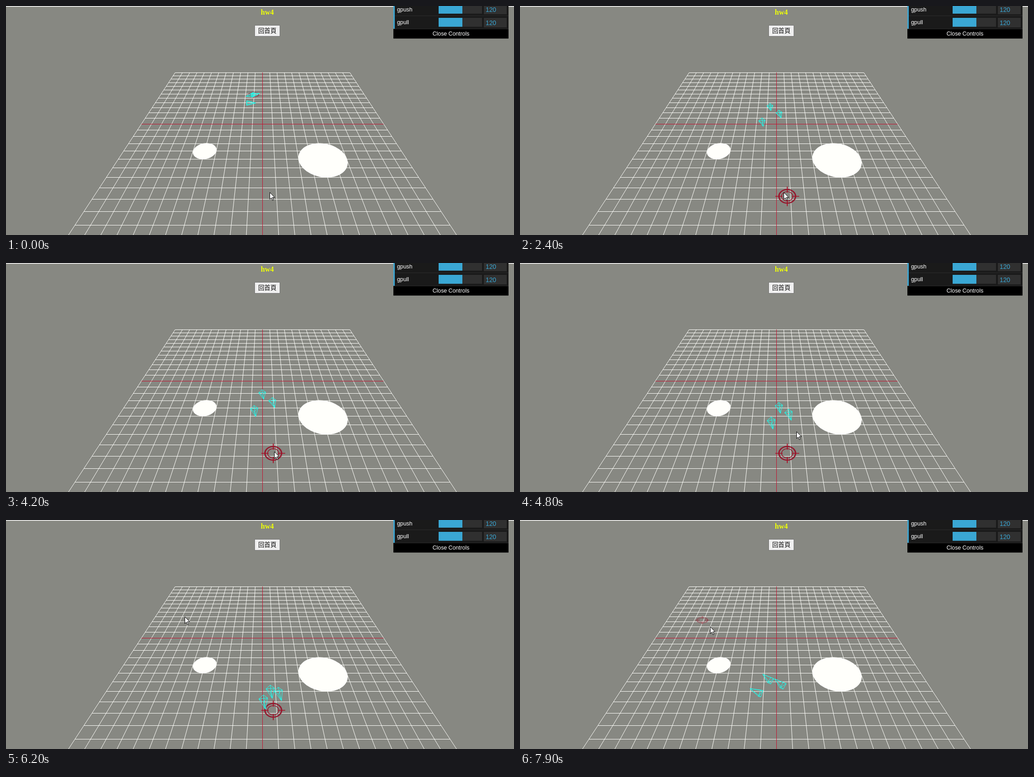
An HTML page with a canvas that plays this animation: 1112x503 px, repeating every 8 s.

```html
<!DOCTYPE html>
<html>
<head>
<meta charset="utf-8">
<style>
html, body { margin: 0; width: 100%; height: 100%; overflow: hidden; background: #878882; }
canvas { display: block; }
</style>
</head>
<body>
<canvas id="stage" width="1112" height="503"></canvas>
<script>
const ctx = document.getElementById('stage').getContext('2d');
const LOOP = 8000, STEP = 100;
const SANS = '"Liberation Sans", Arial, sans-serif';
const RED = '#c4102e', CYAN = '#1cfff0', WHITE = '#fffffb';

const clamp = p => Math.max(0, Math.min(1, p));
const ease = p => p * p * (3 - 2 * p);
const mix = (a, b, p) => a + (b - a) * p;
const progress = (t, from, to) => clamp((t - from) / (to - from));

// Ground plane (u right, v towards the viewer) <-> screen
const CX = 561.5, HORIZON = -145.6, DEPTH = 404.6, UNIT = 22.08;
const HALF = 12, TILT = 0.3865 / HALF, RISE = 17.7;
const scaleAt = y => (y - HORIZON) / DEPTH;
function project(u, v, h = 0) {
  const s = 1 / (1 - TILT * v);
  return [CX + UNIT * u * s, HORIZON + DEPTH * s - RISE * h * s];
}
function unproject([x, y]) {
  const s = scaleAt(y);
  return [(x - CX) / (UNIT * s), (1 - 1 / s) / TILT];
}

// Each boid glides from start to dock, then leaves for the next target.
// spin: initial heading offset; bend: how late it moves along u and v
const TRAVEL = 6800, TURN = 6600, LAST = 7900;
const boids = [
  { start: [527, 213], dock: [565, 398], leave: [527, 381], spin: 1.4, bend: [1.5, 1] },
  { start: [542, 194], dock: [580, 378], leave: [549, 353], spin: -1.2, bend: [1.3, 1.3] },
  { start: [538, 196], dock: [597, 381], leave: [576, 364], spin: 1.8, bend: [.4, 1] }
].map(b => ({ ...b, path: [b.start, b.dock, b.leave].map(unproject) }));

const heading = (a, b) => Math.atan2(b[0] - a[0], b[1] - a[1]);
function boidPose({ path: [start, dock, leave], spin, bend }, t) {
  const glide = ease(clamp(t / TRAVEL));
  const away = progress(t, TURN, LAST) ** 2;
  const pos = start.map((a, k) =>
    mix(a, dock[k], glide ** bend[k]) + (leave[k] - dock[k]) * away);
  const cruise = heading(start, dock) + spin * Math.exp(-t / 550);
  const turn = ease(progress(t, TURN - 200, LAST - 300));
  return [...pos, mix(cruise, heading(dock, leave), turn)];
}

// Pointer moves: when, until when, where to
const pointerHome = [577, 409];
const pointerMoves = [
  [2400, 4200, 587, 414],
  [4600, 5400, 659, 239],
  [5400, 6100, 391, 212],
  [7200, 7900, 416, 234]
];
const pointerAt = t => pointerMoves.reduce(([x, y], [from, to, nx, ny]) => {
  const p = progress(t, from, to);
  return [mix(x, nx, p), mix(y, ny, p)];
}, pointerHome);

function rect(x, y, w, h, color) {
  ctx.fillStyle = color;
  ctx.fillRect(x, y, w, h);
}
function text(str, x, y, font, color, align = 'left') {
  ctx.font = font;
  ctx.fillStyle = color;
  ctx.textAlign = align;
  ctx.fillText(str, x, y);
}
function line(a, b, color) {
  ctx.strokeStyle = color;
  ctx.beginPath();
  ctx.moveTo(...a);
  ctx.lineTo(...b);
  ctx.stroke();
}
function disc(x, y, rx, ry, angle) {
  ctx.fillStyle = WHITE;
  ctx.beginPath();
  ctx.ellipse(x, y, rx, ry, angle, 0, 7);
  ctx.fill();
}

function drawGrid() {
  const row = (i, color) => {
    const [x, y] = project(-HALF, i), level = Math.floor(y + .01) + .5;
    line([x, level], [2 * CX - x, level], color);
  };
  const column = (i, color) => line(project(i, -HALF), project(i, HALF), color);
  ctx.lineWidth = 1;
  for (let i = -HALF; i <= HALF; i++) {
    if (!i) continue;
    row(i, WHITE);
    column(i, WHITE);
  }
  row(0, RED);
  column(0, RED);
}

function drawTarget(x, y) {
  const s = scaleAt(y);
  ctx.save();
  ctx.translate(x, y);
  ctx.scale(UNIT * s, DEPTH * TILT * s * s);
  ctx.globalAlpha = s > 1 ? .9 : .55;
  ctx.strokeStyle = '#960e26';
  for (const [r, w] of [[.59, .1], [.4, .055]]) {
    ctx.lineWidth = w;
    ctx.beginPath();
    ctx.arc(0, 0, r, 0, 7);
    ctx.stroke();
  }
  ctx.lineWidth = .065;
  for (let i = 0; i < 4; i++) {
    line([.33, 0], [.85, 0], '#a80c24');
    ctx.rotate(Math.PI / 2);
  }
  ctx.restore();
}

// Four-sided wireframe cone lying along its heading
function drawBoid([u, v, a]) {
  const r = .33, du = Math.sin(a), dv = Math.cos(a);
  const apex = project(u + du, v + dv);
  const base = [[1, 0], [0, 1], [-1, 0], [0, -1]].map(([side, up]) =>
    project(u + r * side * dv, v - r * side * du, r * up));
  ctx.lineWidth = 1;
  base.forEach((p, i) => {
    line(p, base[(i + 1) % 4], CYAN);
    line(p, apex, CYAN);
  });
  line(base[0], base[2], CYAN);
}

function drawPanel() {
  const font = '12.3px ' + SANS, blue = '#3aa5d2';
  rect(848, 0, 252, 51, '#1a1a1a');
  ['gpush', 'gpull'].forEach((label, i) => {
    const top = -7 + i * 28.8;
    rect(848, top + 28, 252, 1, '#2c2c2c');
    rect(947, top + 4.2, 95, 19.6, '#303030');
    rect(947, top + 4.2, 52, 19.6, '#3aa7d4');
    rect(1046, top + 4.2, 50, 21, '#303030');
    text(label, 856, top + 18.5, font, '#fff');
    text('120', 1050, top + 20.2, '13.8px ' + SANS, blue);
  });
  rect(848, 0, 3, 50, blue);
  rect(848, 51, 252, 20.5, '#000');
  text('Close Controls', 974, 65, font, '#fff', 'center');
}

function drawHeader() {
  rect(0, 0, 1112, 1.5, '#fff');
  text('hw4', 572, 19, 'bold 16px "Liberation Serif", serif', '#eeff08', 'center');
  rect(544, 42, 56, 25, '#767676');
  rect(545, 43, 54, 23, '#efefef');
  text('回首頁', 572, 59, '13.4px "Noto Sans CJK TC", "Noto Sans CJK", sans-serif', '#111', 'center');
}

const arrow = new Path2D('M.5.5V15.5L4 12.4 6.4 18 8.6 17 6.2 11.5H11Z');
function drawPointer(x, y) {
  ctx.save();
  ctx.translate(Math.round(x), Math.round(y));
  ctx.lineWidth = 1;
  ctx.fillStyle = '#fff';
  ctx.strokeStyle = '#000';
  ctx.fill(arrow);
  ctx.stroke(arrow);
  ctx.restore();
}

function render(now) {
  const t = Math.floor(now % LOOP / STEP) * STEP;
  rect(0, 0, 1112, 503, '#878882');
  drawGrid();
  drawTarget(...(t < 100 ? [542, 195] : t < 6300 ? [585, 418] : [399, 220]));
  disc(435, 318.8, 26.3, 17.3, -.2);
  disc(694, 339, 54.6, 36.9, .2);
  boids.forEach(boid => drawBoid(boidPose(boid, t)));
  drawHeader();
  drawPanel();
  drawPointer(...pointerAt(t));
}

const start = performance.now();
function tick() {
  render(performance.now() - start);
  requestAnimationFrame(tick);
}
tick();
</script>
</body>
</html>
```
